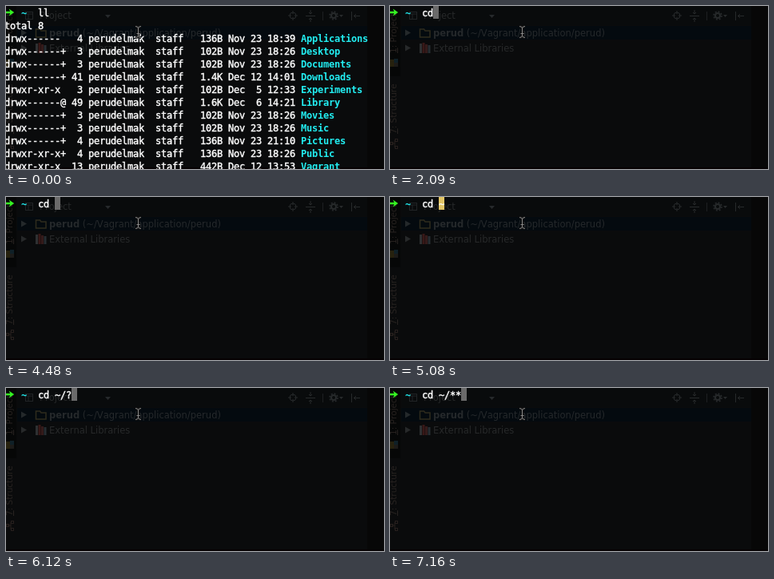
An HTML page for the animation above (8000 ms loop, 473 px wide and 204 px high).

```html
<!DOCTYPE html>
<html lang="en">
<head>
<meta charset="utf-8">
<title>Terminal</title>
<style>
  html, body { margin: 0; width: 100%; height: 100%; overflow: hidden; background: #0a0b0c; }
  #stage { position: relative; width: 473px; height: 204px; overflow: hidden; }
  svg { position: absolute; left: 0; top: 0; }
  svg text { font: 11.5px "DejaVu Sans", "Open Sans", sans-serif; font-kerning: none; fill: #393b3c; }
  svg .tab { font-size: 10.5px; fill: #3a322e; }
  .dim { opacity: .62; }
  pre {
    position: absolute; left: -2px; top: 1px; margin: 0;
    font: 12px/16px "DejaVu Sans Mono", "Liberation Mono", monospace;
    letter-spacing: -.224px;
    font-variant-ligatures: none;
    color: #fff; -webkit-text-stroke: .4px;
  }
  pre b { color: #22eef2; -webkit-text-stroke: 0; }
  #cursor, #mark { position: absolute; top: 0; height: 16px; width: 7px; background: #6a6a6a; }
  #mark { left: 61px; background: #e2c566; }
</style>
</head>
<body>
<div id="stage">
  <svg width="473" height="204" viewBox="0 0 473 204">
    <rect width="473" height="204" fill="#0a0b0c"/>
    <rect width="13" height="88" fill="#060707"/>
    <rect x="14" width="438" height="24" fill="#090b0c"/>
    <rect x="14" y="25" width="438" height="17" fill="#040a0f"/>
    <rect x="452" width="21" height="204" fill="#070707"/>
    <rect y="202" width="473" height="2" fill="#060203"/>

    <g class="dim">
      <!-- tool strip -->
      <text class="tab" transform="translate(8 59) rotate(-90)"><tspan text-decoration="underline">1</tspan>: Project</text>
      <text class="tab" transform="translate(8 160) rotate(-90)"><tspan text-decoration="underline">7</tspan>: Structure</text>
      <rect y="67" width="5" height="9" fill="#3b3213"/>
      <rect x="5" y="66" width="5" height="5" fill="#16303c"/>
      <rect x="5" y="71" width="5" height="5" fill="#2c2825"/>
      <g fill="none" stroke="#382c28">
        <path d="M2 172H6M6 168V177"/>
        <rect x="6.5" y="166.500" width="3" height="3"/>
        <rect x="6.5" y="175.500" width="3" height="3"/>
        <rect x=".5" y="170.500" width="3" height="3"/>
      </g>
      <!-- panel header -->
      <g fill="none" stroke="#303437">
        <rect x="24.500" y="7.500" width="9" height="9"/>
        <path d="M24 10H34M28 10V16"/>
      </g>
      <text x="42" y="16">Project</text>
      <path d="M124 11h7l-3.500 4z" fill="#393c3e"/>
      <g fill="none" stroke="#3a3d3f">
        <circle cx="359" cy="12" r="4"/>
        <path d="M359 6v4M359 14v4M353 12h4M361 12h4"/>
        <path d="M375 12.500h12M381 5v5M379 8l2 2 2-2M381 20v-5M379 17l2-2 2 2"/>
        <path d="M396.500 7V18" stroke="#2b2e30"/>
        <circle cx="410" cy="12" r="3" stroke-width="2"/>
        <circle cx="410" cy="12" r="5" stroke-width="1.600" stroke-dasharray="1.960"/>
        <path d="M432.500 7V18M435 12.500h8M438 10l-2.500 2.500 2.500 2.500"/>
      </g>
      <path d="M417 11h5l-2.500 3z" fill="#3a3d3f"/>
      <!-- tree -->
      <path d="M19 29.500l7 4-7 4zM19 48.500l7 4-7 4z" fill="#393c3d"/>
      <path d="M37.500 29h5l1.500 2h6v8H37.500z" fill="none" stroke="#4a4026" stroke-width="1.500"/>
      <text x="54" y="38"><tspan font-weight="bold">perud</tspan> (~/Vagrant/application/perud)</text>
      <rect x="37" y="47" width="3" height="12" fill="#44474a"/>
      <rect x="40.500" y="46" width="3" height="13" fill="#57201f"/>
      <rect x="44" y="48" width="3" height="11" fill="#4f2423"/>
      <rect x="47.500" y="49" width="3" height="10" fill="#38424a"/>
      <text x="54" y="57">External Libraries</text>
    </g>
  </svg>

  <div id="mark"></div>
  <div id="cursor"></div>
  <pre id="term"></pre>

  <svg id="beam" width="473" height="204" viewBox="0 0 473 204" fill="none">
    <defs>
      <path id="ibeam" d="M162 25.500q3.500 0 3.500 2.500q0-2.500 3.500-2.500M165.500 28V37M162 39.500q3.500 0 3.500-2.500q0 2.500 3.500 2.500M163.500 34.500h4"/>
    </defs>
    <use href="#ibeam" stroke="#111" stroke-width="3"/>
    <use href="#ibeam" stroke="#888"/>
  </svg>
  <svg width="12" height="16" viewBox="0 0 12 16">
    <path d="M0 6.700H5.200L3.700 3.500L10.200 8L3.700 12.500L5.200 9.300H0z" fill="#35f522"/>
  </svg>
</div>
<script>
const LOOP = 8000, CELL = 7, INPUT_X = 40;
const $ = id => document.getElementById(id);
const term = $('term'), cursor = $('cursor'), mark = $('mark'), beam = $('beam');

// mode, links, size, date, name
const files = [
  ['drwx------ ', 4, '136B', 'Nov 23 18:39', 'Applications'],
  ['drwx------+', 3, '102B', 'Nov 23 18:26', 'Desktop'],
  ['drwx------+', 3, '102B', 'Nov 23 18:26', 'Documents'],
  ['drwx------+', 41, '1.4K', 'Dec 12 14:01', 'Downloads'],
  ['drwxr-xr-x ', 3, '102B', 'Dec  5 12:33', 'Experiments'],
  ['drwx------@', 49, '1.6K', 'Dec  6 14:21', 'Library'],
  ['drwx------+', 3, '102B', 'Nov 23 18:26', 'Movies'],
  ['drwx------+', 3, '102B', 'Nov 23 18:26', 'Music'],
  ['drwx------+', 4, '136B', 'Nov 23 21:10', 'Pictures'],
  ['drwxr-xr-x+', 4, '136B', 'Nov 23 18:26', 'Public'],
  ['drwxr-xr-x ', 13, '442B', 'Dec 12 13:53', 'Vagrant']
];
const listing = '\ntotal 8\n' + files.map(([mode, links, size, date, name]) =>
  `${mode} ${String(links).padStart(2)} perudelmak  staff  ${size.padStart(5)} ${date} <b>${name}</b>`
).join('\n');

// time and the command line from then on
const typed = [
  [0, 'll'], [1500, ''], [2090, 'cd'], [2240, 'cd '], [2680, 'cd /'],
  [4480, 'cd '], [4930, 'cd ~'], [5370, 'cd ~/'], [6120, 'cd ~/?'],
  [6260, 'cd ~/??'], [6560, 'cd ~/?'], [6710, 'cd ~/'],
  [6860, 'cd ~/*'], [7160, 'cd ~/**']
];

const show = (el, on) => { el.style.visibility = on ? 'visible' : 'hidden'; };
let shown = -1;

function draw(now) {
  const t = now % LOOP;
  const i = typed.findLastIndex(step => step[0] <= t);
  if (i !== shown) {
    shown = i;
    const text = typed[i][1];
    const composing = text === 'cd ~';
    term.innerHTML = `   <b>~</b>  ${text}` + (i ? '' : listing);
    cursor.style.left = INPUT_X + CELL * text.length + 'px';
    show(cursor, i > 0 && !composing);
    show(mark, composing);
  }
  show(beam, t < 4780 || t >= 5080);
}

const start = performance.now();
function tick() {
  draw(performance.now() - start);
  requestAnimationFrame(tick);
}
tick();
</script>
</body>
</html>
```
